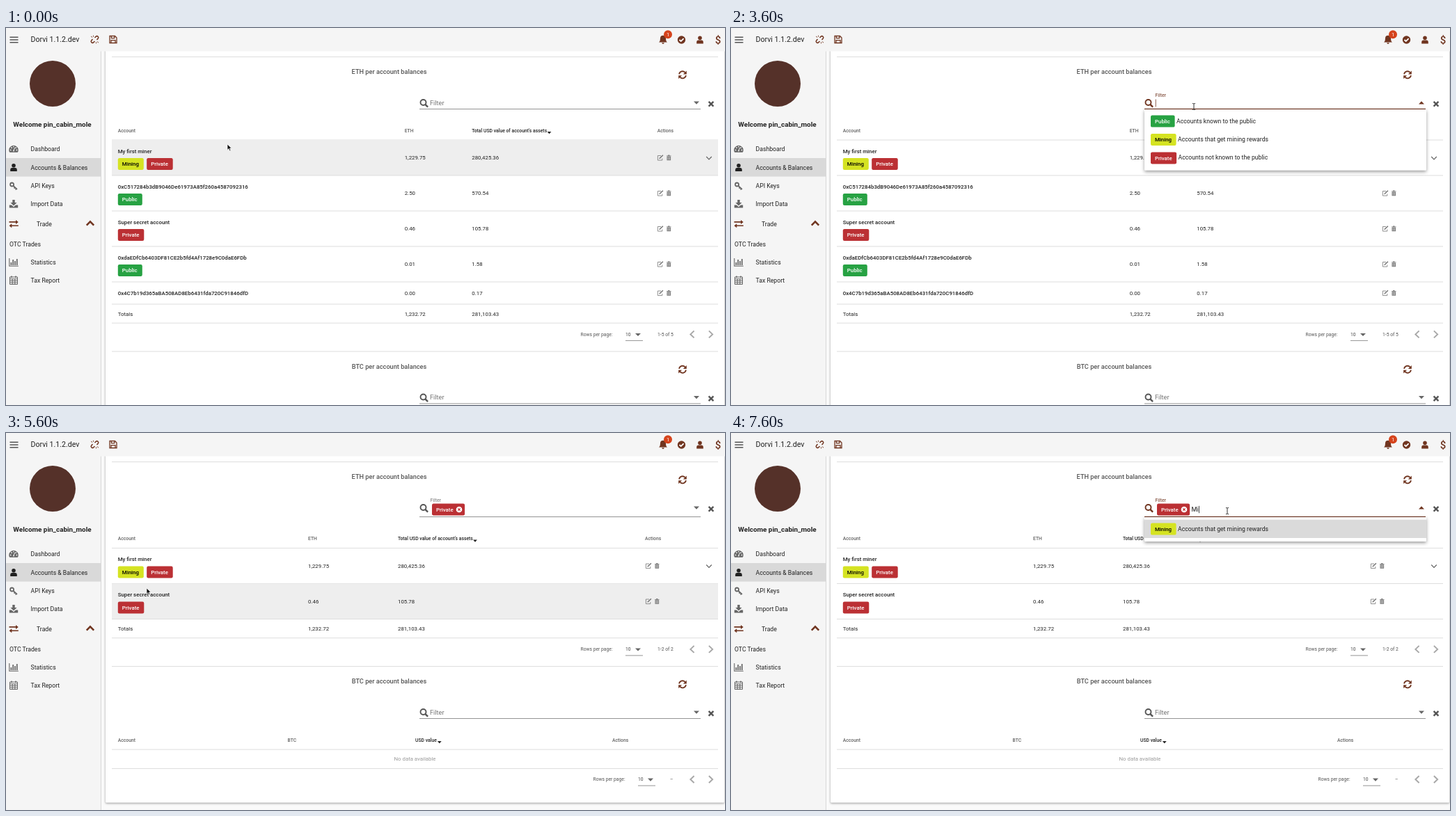
An HTML page for the animation above (8 s loop, 1033 by 542 pixels).

```html
<!DOCTYPE html>
<html lang="en">
<head>
<meta charset="utf-8">
<title>Account filter</title>
<style>
  html, body { margin: 0; width: 100%; height: 100%; overflow: hidden; background: #fafafa; }
  svg { display: block; width: 100vw; height: 100vh; }
  text { font-family: Roboto, sans-serif; white-space: pre; }
  .card { filter: drop-shadow(0 1px 1.5px rgba(0, 0, 0, .4)); }
  .menu { filter: drop-shadow(0 2.5px 2.5px rgba(0, 0, 0, .4)); }
</style>
</head>
<body>
<svg id="stage" viewBox="0 0 1033 542"></svg>
<script>
const LOOP = 8000, STEP = 100;
const BROWN = '#703520', INK = '#212121', GREY = '#666', LINE = '#dedede', PANEL = '#f5f5f5';
const TAGS = {
  Public: { color: '#27a243', ink: '#fff', width: 35, note: 'Accounts known to the public' },
  Mining: { color: '#d5e322', ink: '#000', width: 37, note: 'Accounts that get mining rewards' },
  Private: { color: '#bb3034', ink: '#fff', width: 37.5, note: 'Accounts not known to the public' }
};
const ACCOUNTS = [
  { name: 'My first miner', tags: ['Mining', 'Private'], eth: '1,229.75', usd: '280,425.36' },
  { name: '0xC517284b3dB9046De61973A85f260a4587092316', tags: ['Public'], eth: '2.50', usd: '570.54' },
  { name: 'Super secret account', tags: ['Private'], eth: '0.46', usd: '105.78' },
  { name: '0xdaEDfCb6403DF81CE2b5fd4Af1728e9C0daE6FDb', tags: ['Public'], eth: '0.01', usd: '1.58' },
  { name: '0x4C7b19d365aBA508AD8Eb6431fda720C91846dfD', tags: [], eth: '0.00', usd: '0.17' }
];

// Drawing helpers; text y is the middle of the capital letters.
const text = (x, y, str, size, { fill = INK, weight = 400, anchor = 'start' } = {}) =>
  `<text x="${x}" y="${y + size * .36}" font-size="${size}" font-weight="${weight}" fill="${fill}" text-anchor="${anchor}">${str}</text>`;
const rect = (x, y, w, h, fill, extra = '') =>
  `<rect x="${x}" y="${y}" width="${w}" height="${h}" fill="${fill}" ${extra}/>`;
const rule = (y, x1 = 152, x2 = 1023, color = LINE, h = 1) => rect(x1, y - h / 2, x2 - x1, h, color);
const at = (x, y, body) => `<g transform="translate(${x} ${y})">${body}</g>`;
const solid = (d, color) => `<path d="${d}" fill="${color}"/>`;
const stroke = (d, color, w = 1.4) => `<path d="${d}" fill="none" stroke="${color}" stroke-width="${w}"/>`;
const dot = (x, y, r, color) => `<circle cx="${x}" cy="${y}" r="${r}" fill="${color}"/>`;
const ring = (x, y, r, color, w) => `<circle cx="${x}" cy="${y}" r="${r}" fill="none" stroke="${color}" stroke-width="${w}"/>`;

const icon = {
  link: c => stroke('M0-2.6L1.8-4.3A2.1 2.1 0 0 1 4.8-1.4L3 .4M0 2.6L-1.8 4.3A2.1 2.1 0 0 1-4.8 1.4L-3-.4', c, 1.5) +
    stroke('M-3.4-3L-5.5-4.6M-2-3.8V-5.8M3.4 3L5.5 4.6M2 3.8V5.8', c, .9),
  save: c => stroke('M-5-5H2.5L5-2.5V5H-5ZM-2.6-5V-1.8H1.8V-5M-3 5V1.2H3V5', c, 1.3),
  bell: c => solid('M-6 3.6C-3.8 2-4.3-.5-4-2.2A4 4 0 0 1 4-2.2C4.3-.5 3.8 2 6 3.6ZM-1.7 4.2A1.7 1.7 0 0 0 1.7 4.2Z', c),
  check: c => dot(0, 0, 5.7, c) + stroke('M-3 0L-.8 2.1L3.1-1.9', '#fff', 1.8),
  user: c => dot(0, -2.7, 2.8, c) + solid('M-4.8 5.4V3.7A3 3 0 0 1-2 .6H2A3 3 0 0 1 4.8 3.7V5.4Z', c),
  gauge: c => solid('M-5.7 4.8A6.6 6.6 0 1 1 5.7 4.8Z', c) + stroke('M0 2.5L1.5-2', PANEL, 1) +
    [[-4.3, 1.5], [-3, -1.8], [0, -3.4], [3.2, -1.8], [4.4, 1.5], [0, 2.5]].map(p => dot(...p, .9, PANEL)).join(''),
  key: c => ring(-2.4, -2, 2.5, c, 1.8) + stroke('M-.5 0L5 4.8M2 2L.6 3.6M4 3.9L2.6 5.5', c, 1.7),
  download: c => solid('M-1.7-6H1.7V-2H4.6L0 2.4L-4.6-2H-1.7ZM-6.2 1.6H-3L0 4.2L3 1.6H6.2V5.6H-6.2Z', c),
  swap: c => solid('M-6.5-3.4H3V-5.6L6.8-2.5L3 .4V-1.8H-6.5ZM6.8 1.9H-2.7V-.2L-6.5 2.8L-2.7 5.8V3.5H6.8Z', c),
  chart: c => stroke('M-6.2-6V5.3H6.8', c, 1.1) + stroke('M-3.6 4V0M-.8 4V-4M2 4V-2M4.8 4V-5', c, 1.7),
  grid: c => stroke('M-5.5-5H5.5V5.5H-5.5ZM-5.5-2.2H5.5M-5.5 .4H5.5M-5.5 3H5.5M-1.8-2.2V5.5M1.8-2.2V5.5', c, 1) +
    stroke('M-3-6.5V-4M3-6.5V-4', c, 1.5),
  search: c => ring(-1, -1, 4, c, 1.9) + stroke('M1.8 1.8L5.6 5.6', c, 2.4),
  refresh: c => [0, 180].map(a => `<g transform="rotate(${a})">${
    stroke('M-4.9-.9A4.9 4.9 0 0 1 3.6-3.4', c, 1.8) + solid('M5.8-5.8V-.9H.9Z', c)}</g>`).join(''),
  cross: c => stroke('M-3.4-3.4L3.4 3.4M3.4-3.4L-3.4 3.4', c, 2.4),
  edit: c => stroke('M1-3H-3.6V3.6H2.8V1', c, .8) + stroke('M-1.3 1.3L3.9-3.7', c, 1.5),
  trash: c => solid('M-3.3-3.1H-1.2V-4H1.2V-3.1H3.3V-2.2H-3.3ZM-2.8-1.8H2.8V3.8H-2.8Z', c) +
    stroke('M-1.1-1V3M1.1-1V3', '#fff', .7),
  caret: c => solid('M-4-2H4L0 2.2Z', c),
  caretUp: c => solid('M-4 2H4L0-2.2Z', c)
};
const put = (name, x, y, color) => at(x, y, icon[name](color));

const chip = (x, y, name, extra = 0) => {
  const tag = TAGS[name];
  return rect(x, y - 8.5, tag.width + extra, 17, tag.color, 'rx="2.2"') +
    text(x + 6, y, name, 7.85, { fill: tag.ink, weight: 500 });
};

function frame() {
  const menuItem = (y, name, label, x, color = GREY) => put(name, 11, y, color) + text(x, y, label, 8.7);
  return rect(0, 33, 136, 509, PANEL) + rect(136, 33, 1, 509, '#d8d8d8') + rect(0, 187, 136, 26.6, '#d9d9d9') +
    dot(67, 80, 33, '#553129') +
    text(66.5, 138, 'Welcome pin_cabin_mole', 9.9, { weight: 700, anchor: 'middle' }) +
    menuItem(174, 'gauge', 'Dashboard', 35.5) +
    menuItem(200.5, 'user', 'Accounts &amp; Balances', 35.5, INK) +
    menuItem(227, 'key', 'API Keys', 35.5) +
    menuItem(253, 'download', 'Import Data', 35.5) +
    menuItem(281.5, 'swap', 'Trade', 44, BROWN) +
    at(121, 281, stroke('M-5.2 2.6L0-2.6L5.2 2.6', BROWN, 2.6)) +
    text(5, 310.5, 'OTC Trades', 8.7) +
    menuItem(337, 'chart', 'Statistics', 35.5) +
    menuItem(363, 'grid', 'Tax Report', 35.5) +
    rect(0, 0, 1033, 33.5, PANEL) +
    at(11.5, 17, stroke('M-6-3.8H6M-6 0H6M-6 3.8H6', '#555', 1.4)) +
    text(35.5, 16.5, 'Dorvi 1.1.2.dev', 10.6) +
    put('link', 127.5, 16.5, BROWN) + put('save', 154, 16.5, BROWN) +
    put('bell', 944, 17, BROWN) + dot(951, 9.3, 6, '#d5431c') +
    text(951, 9.3, '1', 7.5, { fill: '#fff', anchor: 'middle' }) +
    put('check', 970.5, 17, BROWN) + put('user', 997, 17, BROWN) +
    text(1023, 17, '$', 15, { fill: BROWN, weight: 500, anchor: 'middle' });
}

function sectionHead(top, title, { chips = [], open = false, hover = false } = {}) {
  const base = top + 75 + (chips.length ? 4 : 0);
  const label = open || chips.length
    ? text(609.5, top + 54.8, 'Filter', 6.9, { fill: open ? BROWN : '#757575' })
    : text(609, top + 66, 'Filter', 9.2, { fill: '#757575' });
  const picked = chips.map(name => chip(612, top + 68.5, name, 9.6) + dot(651, top + 68.5, 4.3, '#fff') +
    at(651, top + 68.5, stroke('M-1.7-1.7L1.7 1.7M1.7-1.7L-1.7 1.7', TAGS[name].color, 1.2))).join('');
  return rule(top) +
    text(550.5, top + 21.5, title, 9.2, { fill: '#555', weight: 500, anchor: 'middle' }) +
    put('refresh', 972, top + 25.8, BROWN) + put('search', 600.5, top + 66.5, open ? BROWN : '#555') +
    label + picked +
    rule(base, 594, 998, open ? BROWN : hover ? '#666' : '#949494', open ? 1.3 : 1) +
    put(open ? 'caretUp' : 'caret', 992, top + 66, open ? BROWN : GREY) + put('cross', 1013, top + 67.8, '#555');
}

function tableHead(y, cols, coin, usd, arrowX, dark) {
  const cell = (x, label, fill = '#636363') => text(x, y, label, 6.8, { fill, weight: 500 });
  return cell(160.7, 'Account', dark ? INK : undefined) + cell(cols[0], coin) + cell(cols[1], usd, INK) +
    cell(cols[2], 'Actions') + at(arrowX, y + 3.2, solid('M-2.9-1.6H2.9L0 1.6Z', INK)) + rule(y + 13.5);
}

function pager(y, range, shift = 0) {
  const arrow = (x, s) => at(x, y, stroke(`M${2.6 * s}-5L${-2.6 * s} 0L${2.6 * s} 5`, '#a8a8a8', 2));
  return text(825.5 + shift, y, 'Rows per page:', 6.75, { fill: '#555' }) +
    text(890 + shift, y, '10', 6.75, { fill: '#444' }) + rule(y + 9, 890 + shift, 915 + shift, '#949494') +
    put('caret', 908 + shift, y + .5, GREY) + text(936 + shift, y, range, 6.75, { fill: '#555' }) +
    arrow(986, 1) + arrow(1012.5, -1);
}

// Pointer path: time, x, y. Equal neighbours are rests.
const PATH = [
  [0, 318, 167], [500, 318, 167], [600, 318, 158], [800, 318, 140], [1200, 318, 140], [1900, 665, 113],
  [3700, 665, 113], [4000, 682, 194], [4700, 682, 194], [4800, 650, 205], [4900, 604, 222],
  [5000, 520, 235], [5200, 280, 240], [5300, 280, 240], [5400, 150, 280], [5600, 202, 223],
  [5700, 230, 262], [5800, 230, 262], [5900, 260, 290], [6000, 400, 230], [6100, 560, 160],
  [6200, 672, 122], [6300, 672, 122], [6500, 713, 112], [LOOP, 713, 112]
];
function pointerAt(t) {
  const i = Math.max(1, PATH.findIndex(p => p[0] >= t));
  const [t0, x0, y0] = PATH[i - 1], [t1, x1, y1] = PATH[i];
  const k = Math.max(0, (t - t0) / (t1 - t0));
  return { x: x0 + (x1 - x0) * k, y: y0 + (y1 - y0) * k };
}

function pointer({ x, y }, shape) {
  const outline = d => `<path d="${d}" fill="#111" stroke="#fff" stroke-width=".7"/>`;
  const shapes = {
    beam: () => stroke('M-2-4.6Q0-4.6 0-3.6V3.6Q0 4.6-2 4.6M2-4.6Q0-4.6 0-3.6M0 3.6Q0 4.6 2 4.6', '#333', 1),
    hand: () => outline('M-1 0H.7V3.6L5.5 4.6V8L4.5 10.5H-.5L-3.5 6L-2.5 5L-1 6.5Z'),
    arrow: () => outline('M0 0V8.4L2 6.6L3.4 9.7L4.9 9L3.5 6H6.2Z')
  };
  return at(x, y, shapes[shape]());
}

function menu(top, names, active, opacity) {
  const rowH = 26.4;
  const rows = names.map((name, i) => {
    const y = top + 3.6 + rowH * (i + .5);
    return (name === active ? rect(594, y - rowH / 2, 405, rowH, '#dadada') : '') +
      chip(603, y + .3, name, -.4) + text(603 + TAGS[name].width + 2, y - .4, TAGS[name].note, 8.7);
  }).join('');
  return `<g class="menu" opacity="${opacity}">${rect(594, top, 405, names.length * rowH + 8.6, '#fff', 'rx="1"')}${rows}</g>`;
}

function scene(t) {
  const within = (a, b) => t >= a && t < b;
  const filtered = t >= 4300;
  const open = within(2300, 4300) || t >= 6700;
  const mouse = pointerAt(t), before = pointerAt(t - STEP);
  const overField = mouse.x > 594 && mouse.y < 119;
  const typed = t >= 7600 ? 'Mi' : t >= 7300 ? 'M' : '';
  const caretOn = [[2400, 2900], [3600, 5200], [5700, 6200], [6700, 7100], [7300, LOOP]].some(s => within(...s));

  const top = 41.5;
  const cols = filtered ? [434, 563, 918] : [572.7, 669.3, 935.7];
  const actionX = filtered ? 923 : 940;
  const headY = filtered ? 152 : 147.5;
  const list = ACCOUNTS.filter(a => !filtered || a.tags.includes('Private'));

  let y = headY + 13.5, rows = '';
  list.forEach((a, i) => {
    const h = a.tags.length ? 51 : 32, mid = y + h / 2;
    const hovered = !open && before.y > y && before.y < y + h;
    if (hovered) rows += rect(152, y, 871, h, '#eee');
    rows += text(160.7, y + 16, a.name, 7.85, { weight: 500 });
    let x = 160.8;
    for (const tag of a.tags) { rows += chip(x, y + 34.5, tag); x += TAGS[tag].width + 4.4; }
    rows += text(cols[0], mid, a.eth, 7.85) + text(cols[1], mid, a.usd, 7.85) +
      put('edit', actionX, mid, '#757575') + put('trash', actionX + 12.3, mid, '#757575') + rule(y + h);
    if (i === 0) rows += at(1010, mid + .5, stroke('M-3.8-2L0 2L3.8-2', GREY, 1.2));
    y += h;
  });
  const total = y + 13.8;
  rows += text(160.7, total, 'Totals', 7.85) + text(cols[0], total, '1,232.72', 7.85) +
    text(cols[1], total, '281,103.43', 7.85) + rule(y + 27.2);

  const next = y + 68;
  const btc = sectionHead(next, 'BTC per account balances') +
    tableHead(next + 106, [404.5, 588, 871], 'BTC', 'USD value', 622.8) +
    text(587.5, next + 133, 'No data available', 7.8, { fill: '#9a9a9a', anchor: 'middle' }) +
    rule(next + 147) + pager(next + 162.5, '–', 18);

  let out = `<g class="card">${rect(143, 20, 889, next + 176, '#fff', 'rx="1.5"')}</g>` +
    sectionHead(top, 'ETH per account balances', { chips: filtered ? ['Private'] : [], open, hover: overField }) +
    tableHead(headY, cols, 'ETH', "Total USD value of account's assets", filtered ? 674 : 780.5,
      mouse.x < 560 && mouse.y > 134 && mouse.y < 161) +
    rows + pager(total + 29.6, `1-${list.length} of ${list.length}`) + btc;

  if (typed) out += text(661.6, 109.5, typed, 9.2);
  if (caretOn) {
    const caretX = filtered ? 661.6 + [0, 8.3, 10.6][typed.length] : 609.8;
    out += filtered ? rect(caretX, 104.8, .8, 10.4, '#222') : rect(caretX, 102.5, .8, 10.8, BROWN);
  }
  if (open) {
    const active = within(4200, 4300) ? 'Private' : t >= 7400 ? 'Mining' : '';
    out += menu(filtered ? 121 : 117, typed ? ['Mining'] : Object.keys(TAGS), active, within(2300, 2400) ? .6 : 1);
  }
  const shape = overField ? 'beam' : open ? 'hand' : 'arrow';
  return out + frame() + pointer(mouse, shape);
}

const stage = document.getElementById('stage');
const start = performance.now();
let shown = -1;
function tick() {
  const t = Math.floor((performance.now() - start) % LOOP / STEP) * STEP;
  if (t !== shown) stage.innerHTML = scene(shown = t);
  requestAnimationFrame(tick);
}
tick();
</script>
</body>
</html>
```
